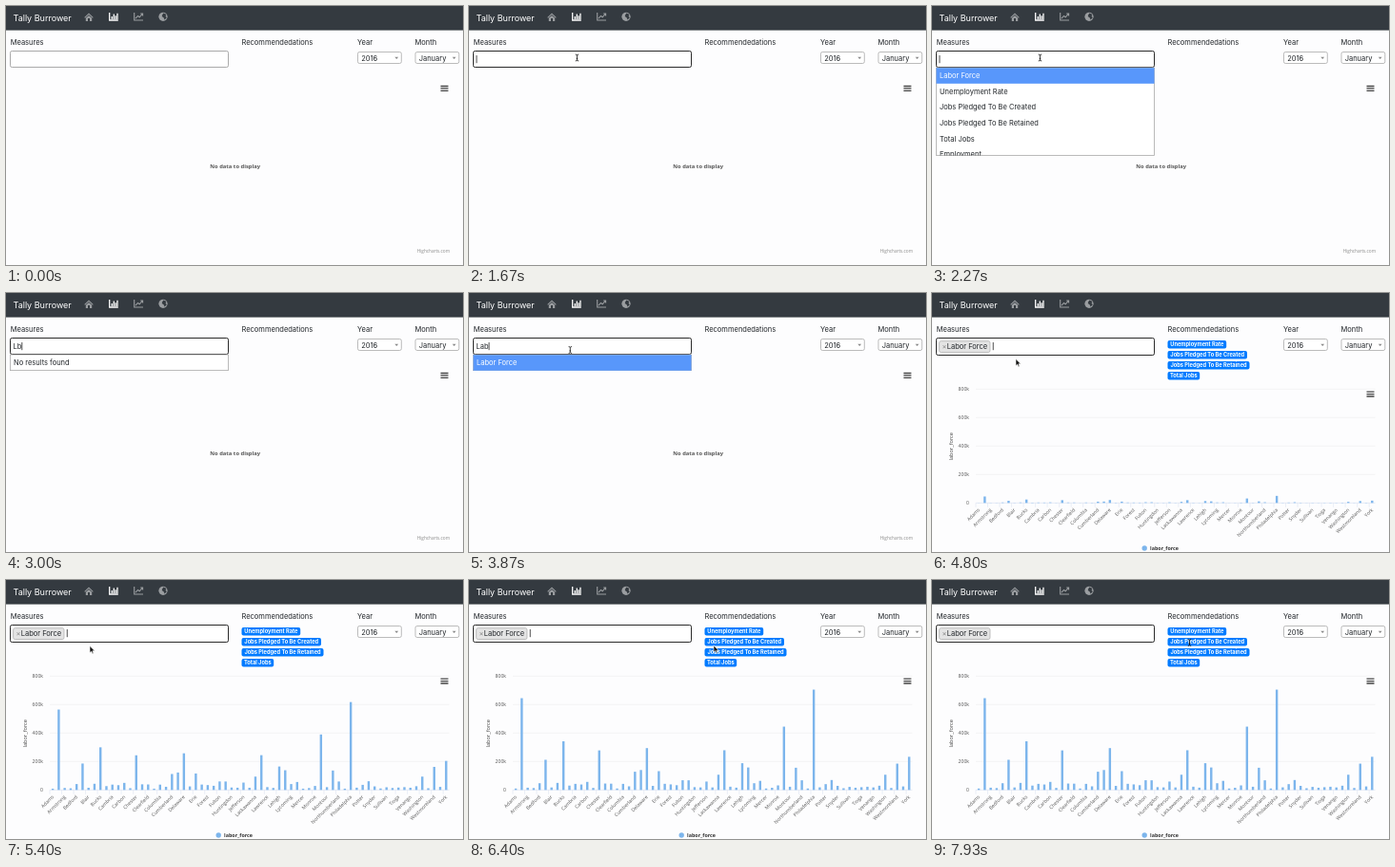
Animation, 480 px wide and 273 px high, one loop 8000 ms. Source, as an HTML page:

```html
<!DOCTYPE html>
<html lang="en">
<head>
<meta charset="utf-8">
<title>Measures dashboard</title>
<style>
html, body { margin: 0; width: 100%; height: 100%; overflow: hidden; background: #fdfdfe; }
svg { display: block; width: 100vw; height: 100vh; }
text { font: 7.5px Inter, "Open Sans", sans-serif; fill: #212529; white-space: pre; }
.brand { font-size: 9px; fill: #fff; }
.tag { font-size: 5.7px; font-weight: 700; fill: #fff; }
.hc { font-family: "Open Sans", "Noto Sans", sans-serif; font-size: 5.1px; fill: #555; }
.title { font-size: 5.6px; fill: #444; }
.notice { font-size: 5.8px; }
.legend { font-size: 5.4px; fill: #333; }
.credit { font-size: 4.7px; fill: #888; }
.bold { font-weight: 700; }
.end { text-anchor: end; }
.mid { text-anchor: middle; }
</style>
</head>
<body>
<svg id="stage" viewBox="0 0 480 273" preserveAspectRatio="none"></svg>
<script>
const LOOP = 8000;
const FOCUS = 1270, OPEN = 1970, KEY = 350, PICK = 4130, CLEAR = 4270, LOAD = 4600;
const stage = document.getElementById("stage");

function add(parent, name, attrs = {}, text) {
  const el = document.createElementNS("http://www.w3.org/2000/svg", name);
  for (const k in attrs) el.setAttribute(k, attrs[k]);
  if (text !== undefined) el.textContent = text;
  parent.appendChild(el);
  return el;
}
const group = (parent = stage) => add(parent, "g");
const rect = (p, x, y, width, height, fill, more = {}) =>
  add(p, "rect", { x, y, width, height, fill, ...more });
const path = (p, d, more = {}) => add(p, "path", { d, ...more });
const label = (p, x, y, text, cls = "", more = {}) =>
  add(p, "text", { x, y, class: cls, ...more }, text);
const show = (el, on) => { el.style.display = on ? "" : "none"; };

// Page header
const grey = "#9a9da0", dark = "#343a40";
rect(stage, 0, 0, 480, 273, "#fdfdfe");
rect(stage, 0, 0, 480, 25.6, dark);
label(stage, 7.5, 15.8, "Tally Burrower", "brand");
path(stage, "M82.3 12 87 7.5 91.7 12 91 12.8 87 9.1 83 12.8Z M83.8 12.8 87 9.9 90.2 12.8V16H88V13H86V16H83.8Z", { fill: grey });
path(stage, "M108.7 7V15H117.8 M111.3 14V11 M113.3 14V8.6 M115.2 14V10.2 M117 14V7.8",
  { stroke: "#fff", "stroke-width": 1.3, fill: "none" });
path(stage, "M134.7 7V15H144 M136 13.2 138.5 10.5 140.2 11.8 143.2 8.4 M141.2 8H143.6V10.4",
  { stroke: grey, "stroke-width": 1.1, fill: "none" });
add(stage, "circle", { cx: 165, cy: 11.3, r: 4.6, fill: grey });
path(stage, "M165.5 7.6 168.4 9 167.6 10.8 168.8 12.3 166.6 14.6 165.6 12.3 163.8 11 164.3 9Z", { fill: dark });

// Form labels and selects
[[4.7, "Measures"], [247.5, "Recommendedations"], [369, "Year"], [429.5, "Month"]]
  .forEach(([x, s]) => label(stage, x, 41.2, s));
[[369.5, "2016"], [430, "January"]].forEach(([x, s]) => {
  rect(stage, x, 48.5, 45.8, 12, "#fff", { stroke: "#aaa", "stroke-width": .8, rx: 1.8 });
  label(stage, x + 3.7, 57.5, s);
  path(stage, `M${x + 38.8} 53.8h3.8l-1.9 2.2Z`, { fill: "#888" });
});

// Measures field
const field = rect(stage, 4.5, 47.5, 229, 17, "#fff", { rx: 1.8 });
const chip = group();
rect(chip, 7.6, 50.7, 53.4, 11.8, "#e4e4e4", { stroke: "#aaa", "stroke-width": .7, rx: 1.8 });
label(chip, 10.4, 59.3, "×", "", { style: "fill:#888" });
label(chip, 15.7, 59.4, "Labor Force");
const typed = label(stage, 7.5, 59, "");
const caret = rect(stage, 8, 52, .8, 8.2, "#222");

// Recommendation badges
const names = ["Unemployment Rate", "Jobs Pledged To Be Created",
  "Jobs Pledged To Be Retained", "Total Jobs"];
const tags = group();
[61.7, 83.5, 86, 33.7].forEach((w, i) => {
  rect(tags, 247.5, 50 + 11 * i, w, 8.4, "#007bff", { rx: 1.9 });
  label(tags, 247.5 + w / 2, 56.2 + 11 * i, names[i], "tag mid");
});

// Empty chart
const menu = path(stage, "M456.5 84.5h8m-8 2.4h8m-8 2.4h8",
  { stroke: "#444", "stroke-width": 1.3 });
const empty = group();
label(empty, 240.7, 170.8, "No data to display", "hc bold mid notice");
label(empty, 466, 259.8, "Highcharts.com", "hc end credit");

// Chart
const LEFT = 46, PITCH = 6.26, BASE = 221.3, PER_K = .15;
const counties = ("Adams Armstrong Bedford Blair Bucks Cambria Carbon Chester Clearfield " +
  "Columbia Cumberland Delaware Erie Forest Fulton Huntingdon Jefferson Lackawanna " +
  "Lawrence Lehigh Lycoming Mercer Monroe Montour Northumberland Philadelphia Potter " +
  "Snyder Sullivan Tioga Venango Washington Westmoreland York").split(" ");
const peaks = { 1: 645, 5: 212, 8: 342, 14: 278, 20: 128, 21: 140, 22: 294, 24: 132,
  34: 107, 35: 279, 38: 188, 39: 158, 45: 445, 47: 156, 50: 705, 62: 107, 64: 185, 66: 233 };
let seed = 7;
const random = () => (seed = seed * 16807 % 2147483647) / 2147483647;

const chart = group();
for (let k = 0; k <= 800; k += 200) {
  const y = BASE - k * PER_K;
  path(chart, `M${LEFT} ${y}H465.5`, { stroke: k ? "#e6e6e6" : "#ccd6eb", "stroke-width": .5 });
  label(chart, 39, y + 2, k ? k + "k" : "0", "hc end");
}
label(chart, 0, 0, "labor_force", "hc mid title", { transform: "translate(21.9 161.8) rotate(-90)" });
counties.forEach((s, i) => {
  const x = LEFT + 2 * i * PITCH;
  path(chart, `M${x} ${BASE}v4.5`, { stroke: "#ccd6eb", "stroke-width": .4 });
  label(chart, 0, 0, s, "hc end", { transform: `translate(${x + PITCH / 2 + 1.4} 229) rotate(-45)` });
});
const bars = group(chart);
for (let i = 0; i < 2 * counties.length - 1; i++) {
  const small = 10 + 70 * random() ** 2;
  const h = (peaks[i] || small) * PER_K;
  rect(bars, LEFT + (i + .5) * PITCH - 1.2, -h, 2.4, h, "#7cb5ec");
}
add(chart, "circle", { cx: 223.2, cy: 269, r: 2.7, fill: "#7cb5ec" });
label(chart, 229, 271, "labor_force", "hc bold legend");

// One dropdown per query
const queries = ["", "L", "Lb", "L", "La", "Lab"];
const measures = ["Labor Force", ...names, "Employment"];
const clip = add(stage, "clipPath", { id: "list" });
rect(clip, 4, 64.5, 230, 93);

function dropdown(query) {
  const found = measures.filter(s => s.toLowerCase().includes(query.toLowerCase()));
  const rows = found.length ? found : ["No results found"];
  const g = group();
  rect(g, 4.5, 65, 229, Math.min(92.5, 16.6 * rows.length), "#fff", { stroke: "#aaa", "stroke-width": .8 });
  const list = add(g, "g", { "clip-path": "url(#list)" });
  if (found.length) rect(list, 4.5, 65.2, 229, 16.6, "#5897fb");
  rows.forEach((s, i) => label(list, 8, 75.8 + 16.7 * i, s, "",
    found.length && !i ? { style: "fill:#fff" } : {}));
  return g;
}
const panels = queries.map(dropdown);

// Pointers
const arrow = path(stage, "M0 0V7.2L1.7 5.7 2.8 8.2 4 7.7 2.9 5.2H5.2Z",
  { fill: "#111", stroke: "#fff", "stroke-width": .6 });
const beam = path(stage, "M-1.7 -3.4Q0 -3.4 0 -2.6Q0 -3.4 1.7 -3.4M0 -2.6V2.6M-1.7 3.4Q0 3.4 0 2.6Q0 3.4 1.7 3.4M-.8 .9H.8",
  { fill: "none", stroke: "#111", "stroke-width": .8 });

// Pointer moves: start, end, x, y
const moves = [[70, 330, 120, 57], [330, 1130, 113.5, 54.5], [3600, 3870, 106.3, 60],
  [3870, PICK, 88, 69.5], [5470, 6270, 257, 69], [6400, 7130, 270.5, 66]];
const clamp = u => Math.min(1, Math.max(0, u));
const ease = u => (1 - Math.cos(Math.PI * clamp(u))) / 2;

function pointer(t) {
  return moves.reduce(([px, py], [from, to, x, y]) => {
    const e = ease((t - from) / (to - from));
    return [px + (x - px) * e, py + (y - py) * e];
  }, [212, 270]);
}

function draw(t) {
  const focused = t >= FOCUS, picked = t >= PICK, loaded = t >= LOAD;
  const open = picked ? -1 : Math.min(queries.length - 1, Math.floor((t - OPEN) / KEY));
  const text = queries[open] || "";

  field.setAttribute("stroke", focused ? "#2a2a2a" : "#aaa");
  field.setAttribute("height", picked ? 18 : 17);
  typed.textContent = text;
  panels.forEach((p, i) => show(p, i === open));

  const blink = (t - (picked ? 350 : FOCUS) + LOOP) % 1000 < 500;
  show(caret, focused && (blink || text !== ""));
  caret.setAttribute("x", picked ? 63.8 : 7.6 + (text ? typed.getComputedTextLength() : 0));

  show(chip, picked);
  show(empty, t < CLEAR);
  show(menu, t < CLEAR || loaded);
  menu.setAttribute("transform", `translate(0 ${loaded ? 19.7 : 0})`);
  show(tags, loaded);
  show(chart, loaded);
  bars.setAttribute("transform", `translate(0 ${BASE}) scale(1 ${ease((t - LOAD - 30) / 1000)})`);

  const [x, y] = pointer(t);
  const visible = t >= 70 && !(t >= OPEN + KEY && t < 3600);
  const overText = (y > 48 && y < 64.5 && x < 234) || (x > 260 && y < 69);
  show(arrow, visible && !overText);
  show(beam, visible && overText);
  (overText ? beam : arrow).setAttribute("transform", `translate(${x} ${y})`);
}

const start = performance.now();
function tick() {
  draw((performance.now() - start) % LOOP);
  requestAnimationFrame(tick);
}
tick();
</script>
</body>
</html>
```
